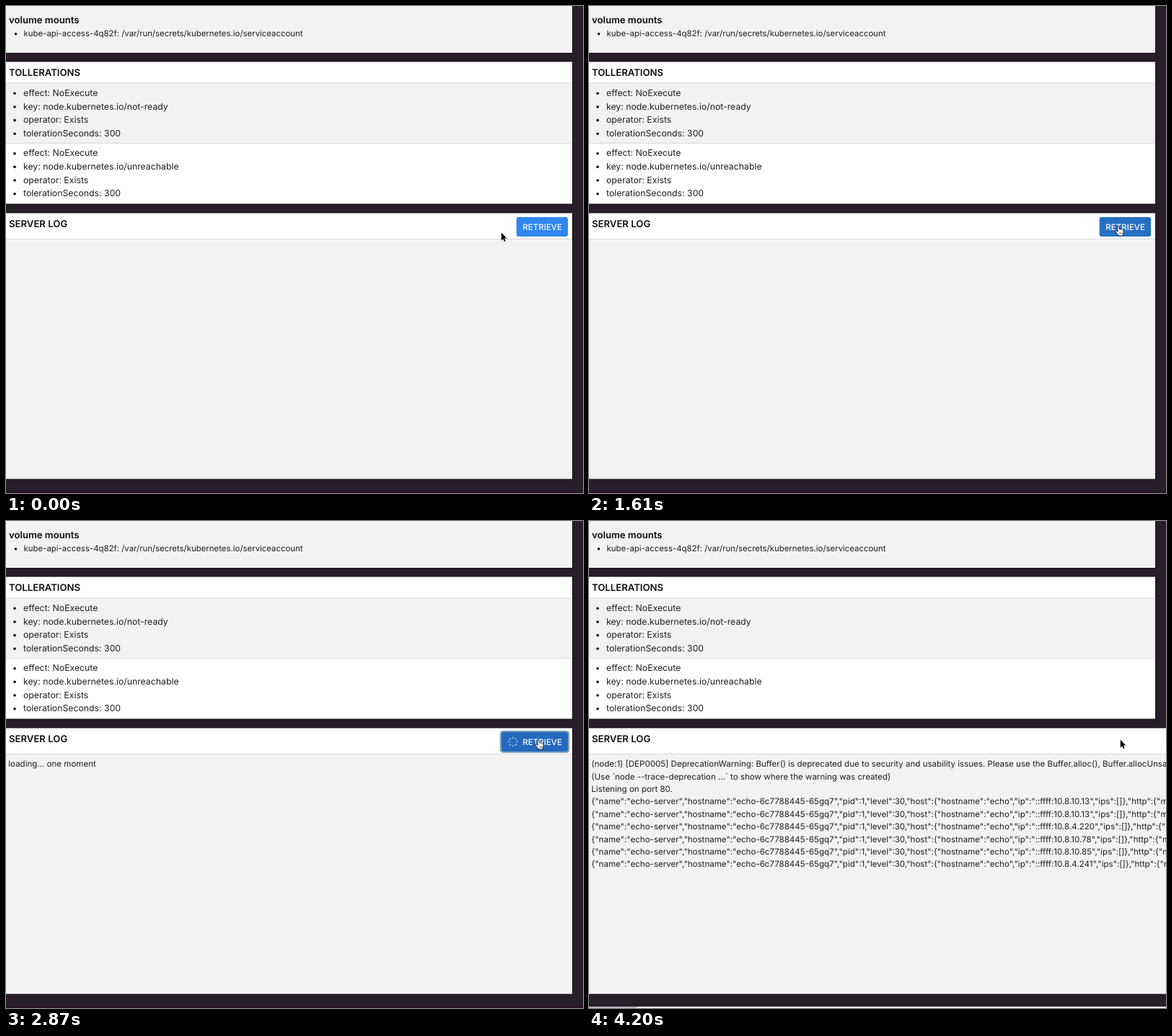
An HTML page for the animation above (4.27 s loop, 800 by 676 pixels).

```html
<!DOCTYPE html>
<html lang="en">
<head>
<meta charset="utf-8">
<title>Server log</title>
<style>
html, body { margin: 0; width: 100%; height: 100%; overflow: hidden; background: #271e29; }
svg { display: block; width: 800px; height: 676px; font-family: Inter, sans-serif; text-rendering: geometricPrecision; }
text { white-space: pre; }
.head { font-size: 13.15px; font-weight: 600; fill: #0c0c0c; }
.item { font-size: 12.27px; fill: #1f1f1f; }
.mount { font-size: 11.42px; fill: #1f1f1f; }
.small { font-size: 11.55px; fill: #1f1f1f; }
.label { font-size: 11.55px; font-weight: 500; fill: #fff; }
.edge { fill: #151017; }
.body { fill: #f2f2f2; }
.white { fill: #fff; }
.line { fill: #dadada; }

.idle, .load, .done, .arrow, .hand, .cursor, .hover { animation: 4.27s infinite step-end; }
.idle { animation-name: idle; }
.load { animation-name: load; }
.done { animation-name: done; }
.arrow { animation-name: arrow; }
.hand { animation-name: hand; }
.hover { animation-name: hover; animation-timing-function: linear; }
.cursor { animation-name: move; animation-timing-function: linear; }
.spin { animation: spin 1s linear infinite; transform-origin: 703px 306.3px; }

/* loading starts at 2520 ms, the log arrives at 3080 ms */
@keyframes idle { 0% { opacity: 1 } 59.02%, 100% { opacity: 0 } }
@keyframes load { 0% { opacity: 0 } 59.02% { opacity: 1 } 72.13%, 100% { opacity: 0 } }
@keyframes done { 0% { opacity: 0 } 72.13%, 100% { opacity: 1 } }
@keyframes arrow { 0% { opacity: 1 } 29.51% { opacity: 0 } 72.13%, 100% { opacity: 1 } }
@keyframes hand { 0% { opacity: 0 } 29.51% { opacity: 1 } 72.13%, 100% { opacity: 0 } }
@keyframes hover { 0%, 29.51% { fill: #2f86ee } 37.7% { fill: #2670c4 } 41%, 100% { fill: #2469bd } }
@keyframes move {
  0% { transform: translate(686px, 314px) }
  8.2%, 24.59% { transform: translate(687px, 314px); animation-timing-function: ease-in-out }
  37.7% { transform: translate(732px, 305px); animation-timing-function: ease-out }
  49.18%, 100% { transform: translate(736px, 303px) }
}
@keyframes spin { to { transform: rotate(360deg) } }
</style>
</head>
<body>
<svg viewBox="0 0 800 676">
  <rect width="800" height="676" fill="#271e29"/>
  <rect y="674" width="800" height="2" fill="#2a102c"/>

  <rect class="edge" width="785.5" height="66"/>
  <rect class="body" width="785" height="65"/>
  <text class="head" x="4" y="24">volume mounts</text>
  <circle cx="13.5" cy="38.8" r="1.7"/>
  <text class="mount" x="24.5" y="42.3">kube-api-access-4q82f: /var/run/secrets/kubernetes.io/serviceaccount</text>

  <rect class="edge" y="76.5" width="785.5" height="199"/>
  <rect class="white" y="77.5" width="785" height="197"/>
  <rect class="body" y="107" width="785" height="84"/>
  <rect class="line" y="106.5" width="785" height="1"/>
  <rect class="line" y="190" width="785" height="1"/>
  <text class="head" x="4" y="97.3">TOLLERATIONS</text>
  <g id="items"></g>

  <g id="panel">
    <rect class="edge" y="286.5" width="785.5" height="371"/>
    <rect class="white" y="287.5" width="785" height="36.5"/>
    <rect class="body" y="324" width="785" height="332.5"/>
    <rect class="line" y="323" width="785" height="1"/>
  </g>
  <g class="done">
    <rect class="edge" y="286.5" width="800" height="371"/>
    <rect class="white" y="287.5" width="800" height="36.5"/>
    <rect class="body" y="324" width="800" height="332.5"/>
    <rect class="line" y="323" width="800" height="1"/>
    <rect y="674" width="800" height="2" fill="#f1eff1"/>
    <rect y="674" width="66" height="2" fill="#b9b5ba"/>
    <g id="log"></g>
  </g>
  <text class="head" x="4" y="307.3">SERVER LOG</text>

  <g class="idle">
    <rect class="hover" x="707.7" y="293" width="71.4" height="27" rx="3"/>
    <text class="label" x="716.3" y="310.8">RETRIEVE</text>
  </g>
  <g class="load">
    <rect x="684.7" y="291" width="96.6" height="31" rx="4.5" fill="#86a3bc"/>
    <rect x="687" y="293" width="92" height="27" rx="3" fill="#2469bd"/>
    <g class="spin" id="dots" fill="#fff"></g>
    <text class="label" x="716.3" y="310.8">RETRIEVE</text>
    <text class="small" x="3.3" y="341.3">loading... one moment</text>
  </g>

  <g class="cursor" stroke-linejoin="round">
    <path class="arrow" d="M0.8 0.6V11.4L3.2 9.2L4.9 13L6.6 12.3L5 8.5H8.2Z" fill="#000" stroke="#fff" stroke-width="0.7" paint-order="stroke"/>
    <g class="hand">
      <path d="M0.4 1.4Q1.5 0 2.6 1.4L3.4 5Q4.5 4.2 5.5 5.2Q6.7 4.6 7.5 5.8Q9 5.5 9.2 7.2L9 10.5L8 14H2.6L-0.4 10.2L-2.4 8Q-2.6 6.4 -0.8 6.8L1.2 8.4Z" fill="#fff" stroke="#111" stroke-width="0.9"/>
      <path d="M3.6 9.3V12M5.3 9.3V12M7 9.3V12" stroke="#111" stroke-width="0.6"/>
    </g>
  </g>
</svg>
<script>
const byId = id => document.getElementById(id);
const text = (cls, x, y, s) => `<text class="${cls}" x="${x}" y="${y}">${s}</text>`;

const item = (s, y) => `<circle cx="12" cy="${y - 3.7}" r="1.8"/>` + text('item', 24, y, s);
const group = (key, top) => ['effect: NoExecute', 'key: node.kubernetes.io/' + key,
  'operator: Exists', 'tolerationSeconds: 300'].map((s, i) => item(s, top + i * 18.67)).join('');
byId('items').innerHTML = group('not-ready', 125) + group('unreachable', 208.4);

const entry = ip => `{"name":"echo-server","hostname":"echo-6c7788445-65gq7","pid":1,"level":30,` +
  `"host":{"hostname":"echo","ip":"::ffff:${ip}","ips":[]},"http":{"method":"GET"`;
const log = [
  '(node:1) [DEP0005] DeprecationWarning: Buffer() is deprecated due to security and usability issues. ' +
    'Please use the Buffer.alloc(), Buffer.allocUnsafe(), or Buffer.from() methods instead.',
  '(Use `node --trace-deprecation ...` to show where the warning was created)',
  'Listening on port 80.',
  ...['10.8.10.13', '10.8.10.13', '10.8.4.220', '10.8.10.78', '10.8.10.85', '10.8.4.241'].map(entry)
];
byId('log').innerHTML = log.map((s, i) => text('small', 3.3, 341.3 + i * 17.38, s)).join('');

byId('dots').innerHTML = Array.from({ length: 8 }, (_, i) => {
  const a = i * Math.PI / 4;
  return `<circle cx="${703 + 5.6 * Math.cos(a)}" cy="${306.3 + 5.6 * Math.sin(a)}" r="0.85"/>`;
}).join('');
</script>
</body>
</html>
```
